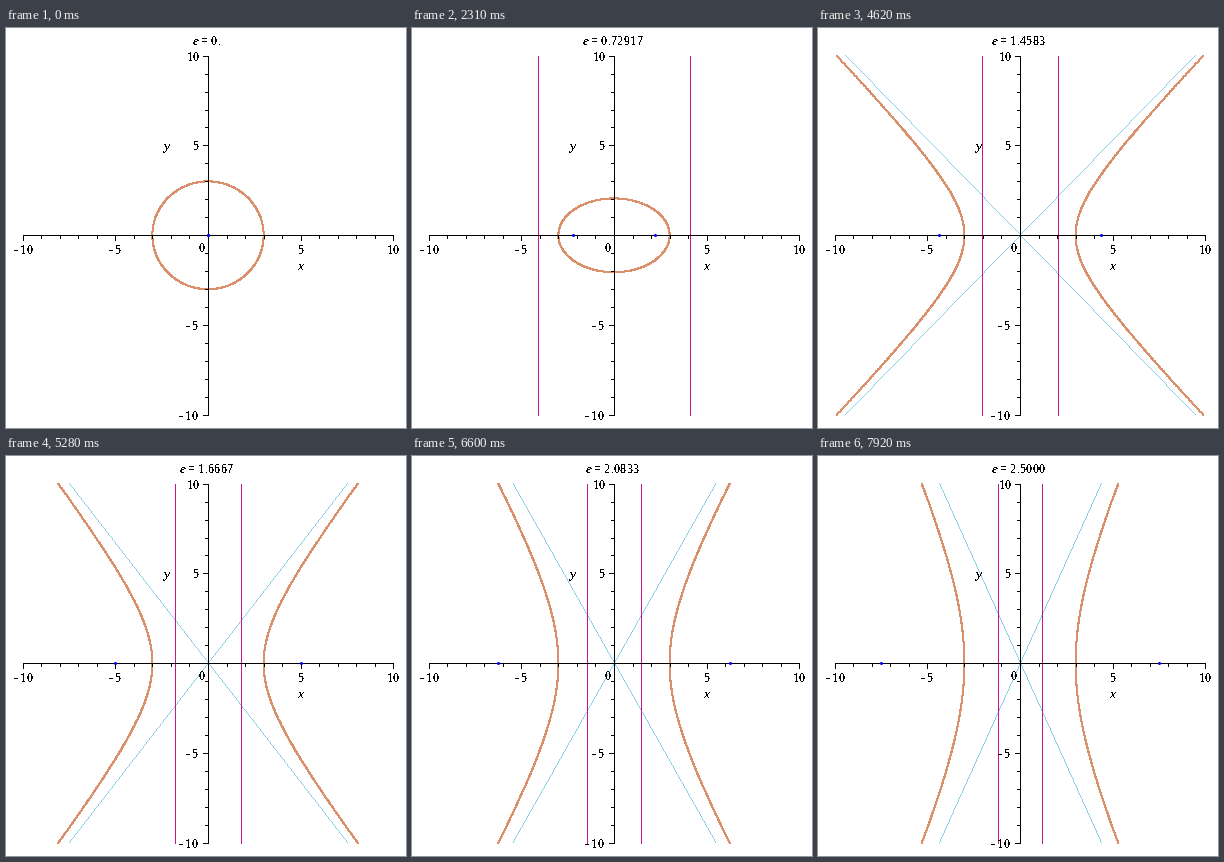
Write a matplotlib script that moves like this. It is 400 by 400 pixels and loops after 8250 ms.

```python
import matplotlib.pyplot as plt
import numpy as np
from matplotlib.animation import FuncAnimation

FRAMES, INTERVAL = 25, 330
PX = 0.72  # points per pixel at 100 dpi
CX, CY, SX, SY = 202, 207.3, 18.545, 17.97
LEFT, RIGHT, TOP, BOTTOM = 17, 387, 28, 387
A, LIM = 3, 10

plt.rcParams.update({
    "font.family": "Liberation Serif",
    "font.size": 13 * PX,
    "mathtext.fontset": "custom",
    "mathtext.rm": "Liberation Serif",
    "mathtext.it": "Liberation Serif:italic",
    "text.antialiased": False,
    "text.hinting": "native",
    "text.hinting_factor": 1,
})

fig = plt.figure(figsize=(4, 4), dpi=100, facecolor="white")
ax = fig.add_axes([0, 0, 1, 1])
ax.set(xlim=(0, 400), ylim=(400, 0))
ax.axis("off")


def to_px(x, y):
    return CX + SX * np.asarray(x), CY - SY * np.asarray(y)


def line(color, z):
    return ax.plot([], [], color=color, lw=PX, antialiased=False, zorder=z,
                   solid_capstyle="butt")[0]


def dots(color, z, marker, size=1):
    """Crisp strokes made of unsmoothed dots."""
    return ax.plot([], [], color=color, ls="", marker=marker, ms=size * PX,
                   mew=0, antialiased=False, zorder=z)[0]


def segment(x0, y0, x1, y1):
    line("black", 5).set_data([x0, x1], [y0, y1])


def label(x, y, s, ha="center"):
    return ax.text(x, y, s, ha=ha, va="baseline", zorder=6)


def number(n):
    return str(n) if n >= 0 else f"-$\\hspace{{0.25}}${-n}"


def draw_axes():
    ox, oy = CX, round(CY)
    segment(LEFT, oy, RIGHT, oy)
    segment(ox, TOP, ox, BOTTOM)
    for n in range(-LIM, LIM + 1):
        x, y = np.round(to_px(n, n))
        size = 3 if n % 5 else 5
        segment(x, oy, x, oy + size)
        segment(ox, y, ox - size, y)
        if n and n % 5 == 0:
            label(x + 0.5, 226, number(n))
            label(193, y + 5, number(n), "right")
    label(196, 224, "0")
    label(295, 242, "$x$")
    label(161, 122, "$y$")


draw_axes()
title = label(201, 17, "")
asymptotes = [dots("#87ceeb", 2, ",") for _ in range(2)]
directrices = [line("#cc148c", 3) for _ in range(2)]
branches = [dots("#db906c", 4, "s", 2.1) for _ in range(2)]
foci = dots("blue", 5.5, "o", 3)


def title_text(e):
    value = "0." if e == 0 else f"{e:.5f}" if e < 1 else f"{e:.4f}"
    return f"$e\\hspace{{0.09}}=\\hspace{{0.09}}${value}"


def conic(e, side):
    b = A * np.sqrt(abs(1 - e * e))
    if e < 1:
        t = np.linspace(-np.pi / 2, np.pi / 2, 500)
        return side * A * np.cos(t), b * np.sin(t)
    t_end = min(np.arccosh(LIM / A), np.arcsinh(LIM / b))
    t = np.linspace(-t_end, t_end, 800)
    return side * A * np.cosh(t), b * np.sinh(t)


def asymptote(e, side):
    slope = np.sqrt(e * e - 1)
    reach = min(LIM, LIM / slope)
    steps = int(2 * reach * max(SX, SY * slope)) + 1
    x = np.linspace(-reach, reach, steps)
    return x, side * slope * x


def update(i):
    e = 2.5 * i / (FRAMES - 1)
    title.set_text(title_text(e))
    foci.set_data(*to_px([-A * e, A * e], [0, 0]))

    d = A / e if e else np.inf
    for side, branch, direc, asym in zip((-1, 1), branches, directrices,
                                         asymptotes):
        branch.set_data(*to_px(*conic(e, side)))
        direc.set_visible(d <= LIM)
        if d <= LIM:
            x = CX + side * SX * d
            direc.set_data([x, x], [TOP, BOTTOM])
        asym.set_visible(e > 1)
        if e > 1:
            asym.set_data(*to_px(*asymptote(e, side)))
    return [title, foci, *branches, *directrices, *asymptotes]


anim = FuncAnimation(fig, update, frames=FRAMES, interval=INTERVAL,
                     repeat=True, repeat_delay=0, blit=False)
plt.show()
```
